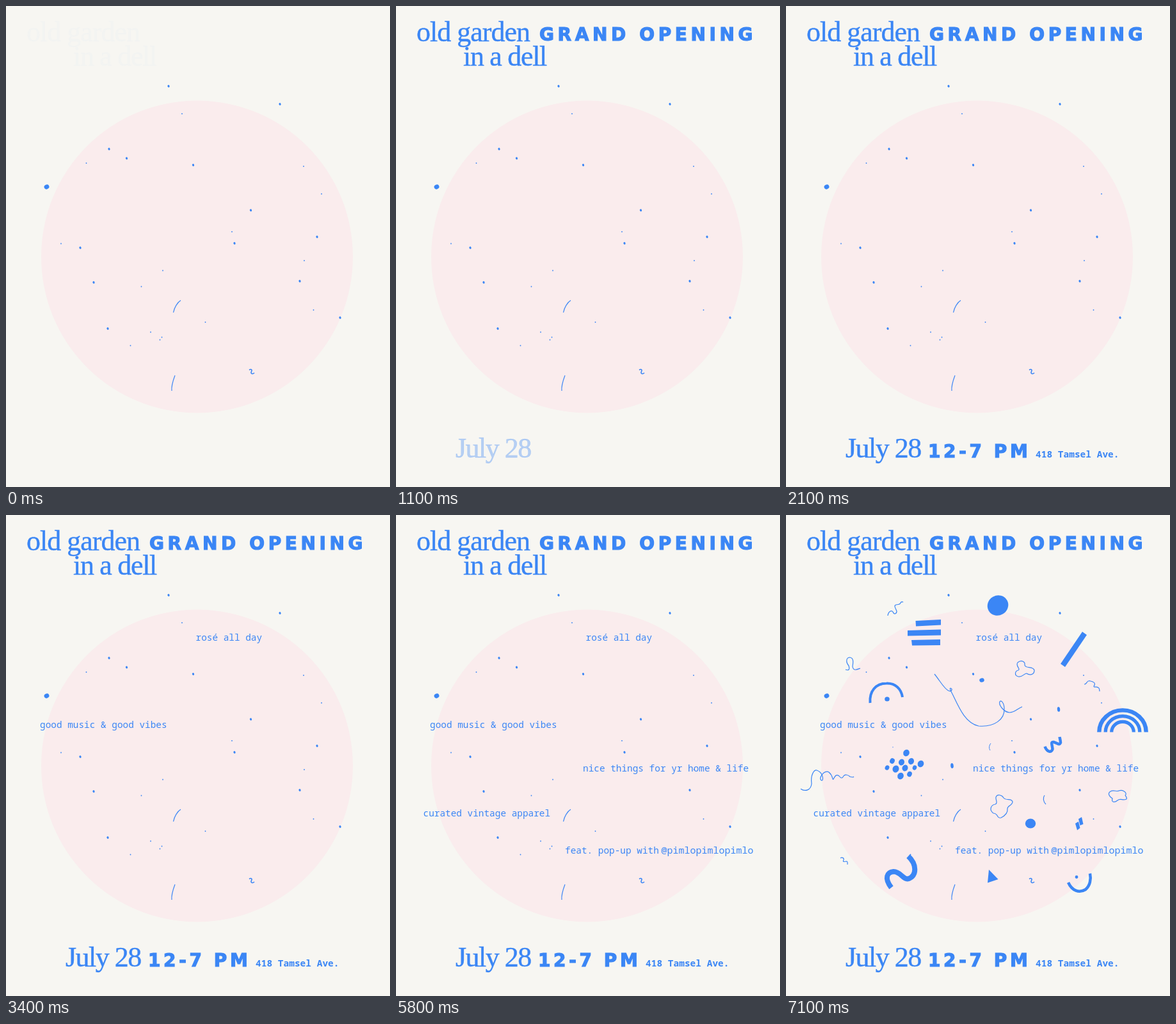
Write an HTML page with a canvas that moves like this. It is 600x750 px and loops after 8800 ms.

```html
<!DOCTYPE html>
<html lang="en">
<head>
<meta charset="utf-8">
<title>Grand opening</title>
<style>
  html, body { margin: 0; width: 100%; height: 100%; overflow: hidden; background: #f7f6f2; }
  canvas { display: block; }
</style>
</head>
<body>
<canvas id="stage" width="600" height="750"></canvas>
<script>
const ctx = document.getElementById('stage').getContext('2d');
const LOOP = 8800, STEP = 100;
const BG = '#f7f6f2', PINK = '#faeced', BLUE = '#3b86f5';

const SERIF = '"Liberation Serif", serif';
const WIDE = '"DejaVu Sans", sans-serif';
const MONO = '"Noto Sans Mono", monospace';

function label(str, x, y, font, spacing = 0, outline = 0) {
  ctx.font = font;
  ctx.letterSpacing = spacing + 'px';
  ctx.fillText(str, x, y);
  if (outline) {
    ctx.lineWidth = outline;
    ctx.strokeText(str, x, y);
  }
}
const title = (str, x, y, spacing) => label(str, x, y, '44px ' + SERIF, spacing, 0.4);
const heavy = (str, x, y, spacing) => label(str, x, y, 'bold 28px ' + WIDE, spacing, 1.2);
const note = (str, x, y, size = 14.4, weight = 500) =>
  label(str, x, y, `${weight} ${size}px ${MONO}`);

function dot(x, y, rx, ry = rx, tilt = 0) {
  ctx.beginPath();
  ctx.ellipse(x, y, rx, ry, tilt, 0, Math.PI * 2);
  ctx.fill();
}
function line(d, width = 1.2) {
  ctx.lineWidth = width;
  ctx.stroke(new Path2D(d));
}
const fill = d => ctx.fill(new Path2D(d));

const bigDots = [
  [254, 125], [428, 153], [161, 223], [188.5, 237.5], [292.5, 248], [382.5, 318.5],
  [357, 370], [486, 360], [116, 377], [137, 431], [459, 429], [522, 486], [159, 503]
];
const tinyDots = [
  [275, 168], [125.5, 245], [465, 250], [493, 293], [353, 352], [86, 370.5], [466, 397],
  [245, 412.5], [211.5, 437.5], [480.5, 474], [311.5, 493], [226, 508.5],
  [243.5, 516.5], [240.5, 520.5], [194.5, 529.5]
];
const cluster = [
  [188, 371, 5], [166, 383.5, 4], [180.5, 385.5, 4.7], [195.5, 384, 4.7], [210.5, 388, 5],
  [158, 394, 3.5], [171.5, 396, 5.2], [186, 394.5, 4.7], [201, 394, 3.4], [179, 407, 5],
  [193, 404, 3.9]
];

function backdrop() {
  ctx.fillStyle = BG;
  ctx.fillRect(0, 0, 600, 750);
  ctx.fillStyle = PINK;
  dot(298.5, 391, 243.5);
  ctx.fillStyle = ctx.strokeStyle = BLUE;
  for (const [x, y] of bigDots) dot(x, y, 1.6, 1.9, -0.4);
  for (const [x, y] of tinyDots) dot(x, y, 0.9);
  dot(63.5, 282, 4, 3.4, -0.4);
  line('M273 459C268 462 263 470 261.5 478');
  line('M264 576C261 584 258 592 259 600');
  line('M380 567.5C383 565.5 385 567 383.5 570C381.5 573.5 385.5 574.5 388 572', 1.6);
}

function rainbow() {
  for (const [r, w] of [[36.7, 6.4], [26.8, 5.4], [17.3, 5.2]]) {
    ctx.lineWidth = w;
    ctx.beginPath();
    ctx.ellipse(526, 338.5, r, r * 0.93, 0, Math.PI, Math.PI * 2);
    ctx.stroke();
  }
}

// [start, fade duration, draw]; a duration of 0 is a hard cut
const scenes = [
  [0, 400, () => {
    title('old garden', 32, 55, -1);
    title('in a dell', 105, 93, -1.3);
  }],
  [500, 400, () => heavy('GRAND OPENING', 224, 54, 5.6)],
  [1000, 300, () => title('July 28', 93, 704, -1.5)],
  [1500, 300, () => heavy('12-7 PM', 222, 704, 4.6)],
  [1800, 300, () => note('418 Tamsel Ave.', 390, 704, 14.5, 700)],
  [2700, 0, () => note('rosé all day', 296.5, 196)],
  [3400, 0, () => note('good music & good vibes', 53, 331.5)],
  [4300, 0, () => note('nice things for yr home & life', 292, 399.5)],
  [5200, 0, () => note('curated vintage apparel', 42.5, 469.5)],
  [5800, 0, () => {
    note('feat. pop-up with', 264, 527.5);
    note('@pimlopimlopimlo', 414.5, 527.5, 15);
  }],

  [5900, 200, () => fill('M317 553L331.5 568L315 573.5Z')],
  [6000, 200, () => {
    fill('M457 474L462 471L464.5 482L459.5 484Z');
    fill('M452 481L457 478L459.5 488L455 491.5Z');
    line('M404 437C401 441 402 447 406 451');
  }],
  [6100, 200, () => {
    for (const [x, y, r] of cluster) dot(x, y, r * 0.95, r * 1.08, 0.4);
    dot(167, 362, 0.7);
  }],
  [6200, 200, () => line('M93 241C98 243 100 241 98 235C93 229 94 222 100 222C106 223 105 230 104 236C105 244 111 241 116 239')],
  [6300, 200, rainbow],
  [6400, 200, () => {
    dot(331, 141, 16.5, 15.5, -0.5);
    dot(382, 481, 8.2, 7.6);
    fill('M202.5 165L242 163L242 171.5L203 173.5Z');
    fill('M190 180L242 178.5L242 187.5L190 188.5Z');
    fill('M196 195L241 194L241 203L197 203.5Z');
  }],
  [6500, 200, () => {
    line('M164.5 581C153 566 158 557 168 556C180 556 183 570 192 567C204 562 205 545 191 532', 8);
    fill('M463 182L470 187L436 237L429 232Z');
    dot(306, 257.5, 3.8, 3.2, -0.3);
    dot(259.5, 391, 2.3, 4, -0.1);
    dot(426, 303, 2.2, 3.8, -0.1);
  }],
  [6600, 200, () => {
    line('M131.5 293C130 275 140 262.5 157 262.5C171 262 180 271 182 284', 4);
    dot(158, 287, 3.8, 3.5);
    line('M404.5 361C408 370 415 371 416.5 365C416 358 413 354 418 354C423 355 427 360 429 355C429 352 428 349 427.5 346', 4.5);
    line('M507 431C512 428 517 432 520 430C526 428 532 432 531 436C528 437 534 440 532 443C526 446 523 441 518 445C513 449 508 448 510 442C505 439 502 434 507 431Z');
  }],

  [6800, 200, () => {
    line('M232 248C241 259 247 271 254 274C259 276 261 271 257 270C255 270 258 275 261 281C271 302 281 325 301 329C325 331 342 319 341 302C341 293 336 288 334 291C332 296 340 307 349 308C358 308 361 302 369 299');
    line('M23 427C30 432 39 429 40 419C38 405 44 397 48 398C58 401 59 414 56 414C49 412 60 396 67 401C74 407 72 413 74 412C77 406 79 404 83 407C86 411 88 411 90 407C92 404 97 405 100 408C103 409 105 409 106 408');
    line('M441 573C447 586 458 590 468 584C475 578 477 568 475 559', 4.5);
    dot(454, 564.5, 2.4);
  }],
  [6900, 200, () => {
    line('M159 157C160 150 165 148 167 151C169 156 173 154 173 150C171 145 168 141 172 140C176 139 178 140 179 137C180 135 182 135 183 136');
    line('M362 230C368 225 374 229 373 234C374 240 386 235 388 242C388 250 380 250 376 247C372 247 370 253 363 252C356 250 358 243 363 242C367 240 358 235 362 230Z');
    line('M328 440C330 434 338 437 340 441C344 446 352 441 354 447C354 453 346 453 346 458C347 466 340 470 336 472C329 474 332 465 324 465C317 460 320 452 327 451C332 449 327 444 328 440Z');
    line('M466 264C471 264 469 257 476 259C484 261 483 264 481 267C481 270 486 266 489 270C490 272 490 274 490 275');
    line('M85 535C88 533 91 535 90 538C88 542 92 540 95 540C97 541 96 543 96 545');
    line('M320 356C317 360 317 364 319 367', 1);
  }]
];

function draw(t) {
  ctx.globalAlpha = 1;
  backdrop();
  for (const [start, fade, paint] of scenes) {
    if (t < start) continue;
    const p = fade ? Math.min(1, (t - start) / fade) : 1;
    ctx.globalAlpha = 0.02 + 0.98 * p;
    paint();
  }
}

const t0 = performance.now();
function tick() {
  const t = (performance.now() - t0) % LOOP;
  draw(Math.floor(t / STEP) * STEP);
  requestAnimationFrame(tick);
}
tick();
</script>
</body>
</html>
```
